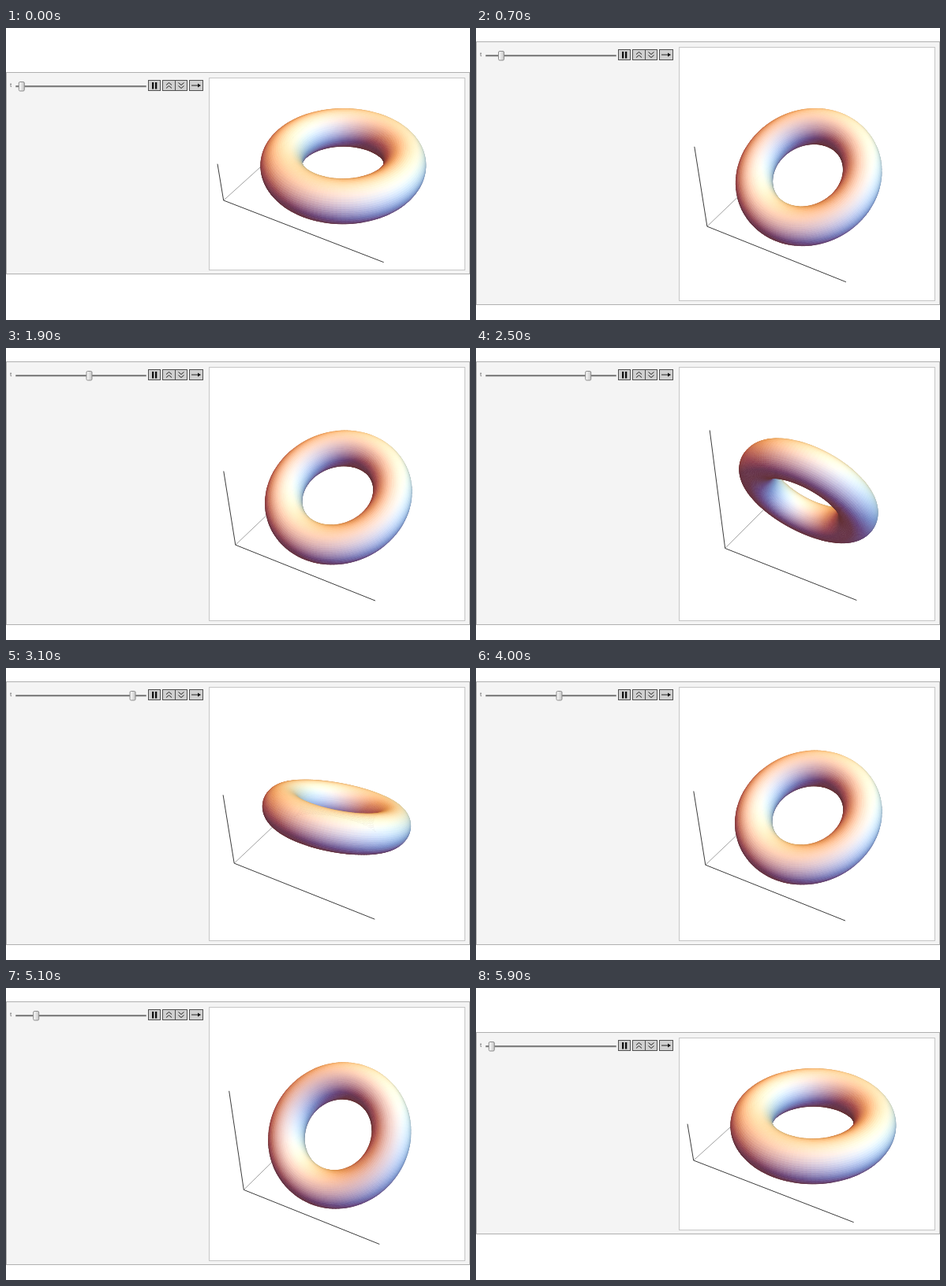
An HTML page with a canvas for the animation above (6 s loop, 588x371 px).

```html
<!DOCTYPE html>
<html lang="en">
<head>
<meta charset="utf-8">
<title>Rotating torus</title>
<style>
html, body { margin: 0; width: 100%; height: 100%; overflow: hidden; background: #fff; }
svg, canvas { position: absolute; left: 0; top: 0; display: block; }
</style>
</head>
<body>
<svg width="588" height="371" viewBox="0 0 588 371">
  <defs>
    <linearGradient id="knob" x1="0" x2="1" y1="0" y2="0">
      <stop offset="0" stop-color="#fff"/>
      <stop offset="1" stop-color="#c4c4c4"/>
    </linearGradient>
  </defs>
  <rect id="panel" x=".5" width="587" fill="#f4f4f4" stroke="#b0b0b0"/>
  <rect id="pane" x="257.5" width="324" fill="#fff" stroke="#c6c6c6"/>
  <g id="controls">
    <text x="5" y="19" font-family="'Liberation Sans', sans-serif" font-size="8" fill="#666">t</text>
    <rect x="12" y="17" width="166" height="2" rx="1" fill="#808080"/>
    <rect x="12" y="19" width="166" height="1" fill="#d8d8d8"/>
    <rect id="thumb" y="12.5" width="7" height="11.500" rx="1.5" fill="url(#knob)" stroke="#8c8c8c"/>
    <g fill="#d0d0d0" stroke="#505050">
      <rect x="180.5" y="10.5" width="15" height="13"/>
      <rect x="198.5" y="10.5" width="16" height="13"/>
      <rect x="214.5" y="10.5" width="15" height="13"/>
      <rect x="232.5" y="10.5" width="17" height="13"/>
    </g>
    <path d="M185 13h2.3v8.500h-2.3zM189 13h2.3v8.500h-2.3zM243 14.5l4 2.5-4 2.5z" fill="#111"/>
    <path d="M235 17h9M203 16.5l3.5-3 3.5 3M203 20.5l3.5-3 3.5 3M218.5 13.5l3.5 3 3.5-3M218.5 17.5l3.5 3 3.5-3" fill="none" stroke="#222"/>
  </g>
  <path id="depthAxis" fill="none" stroke="#777" stroke-width=".7"/>
  <path id="axes" fill="none" stroke="#3c3c3c"/>
</svg>
<canvas id="scene" width="588" height="371"></canvas>
<script>
const $ = id => document.getElementById(id);
const ctx = $("scene").getContext("2d");

const RING = 3, TUBE = 1, DIST = 27.07, PAD = 1.05;
const STEP = 14.66 * Math.PI / 180, FIRST = 0.01;
const NU = 144, NW = 64;

const dot = (a, b) => a[0] * b[0] + a[1] * b[1] + a[2] * b[2];
const unit = a => { const l = Math.hypot(...a); return a.map(v => v / l); };

// Camera basis for the view point (1.3, -2.4, 2)
const TOWARD = unit([1.3, -2.4, 2]);
const RIGHT = unit([2.4, 1.3, 0]);
const UP = [-TOWARD[2] * RIGHT[1], TOWARD[2] * RIGHT[0],
  TOWARD[0] * RIGHT[1] - TOWARD[1] * RIGHT[0]];
const toCamera = p => [dot(p, RIGHT), dot(p, UP), dot(p, TOWARD)];
const project = q => [q[0] / (DIST - q[2]), -q[1] / (DIST - q[2])];

// Directions and colours of the lights, in camera space
const AMBIENT = [0.4, 0.2, 0.2];
const LIGHTS = [
  [[2, 0, 2], [0, 0.18, 0.5]],
  [[2, 2, 3], [0.18, 0.5, 0.18]],
  [[0, 2, 2], [0.5, 0.18, 0]],
  [[0, 0, 2], [0, 0, 0.18]]
].map(([dir, color]) => ({ dir: unit(dir), color }));

function shade(n) {
  const c = AMBIENT.slice();
  for (const l of LIGHTS) {
    const k = Math.max(0, dot(n, l.dir));
    for (let j = 0; j < 3; j++) c[j] += k * l.color[j];
  }
  return "rgb(" + c.map(v => Math.round(255 * Math.min(1, v))) + ")";
}

function boxOf(angle) {
  const s = Math.abs(Math.sin(angle)), c = Math.abs(Math.cos(angle));
  return [RING + TUBE, RING * c + TUBE, RING * s + TUBE].map(v => v * PAD);
}

const corner = (box, sx, sy, sz) =>
  project(toCamera([sx * box[0], sy * box[1], sz * box[2]]));

// Near the quarter turns the view is fitted to the pane width
function layout(angle, box) {
  if (Math.abs(Math.sin(2 * angle)) > 0.16)
    return { scale: 635, cx: 419.5, cy: 185.4, height: 322 };
  const xs = [], ys = [], ends = [-1, 1];
  for (const a of ends) for (const b of ends) for (const c of ends) {
    const [x, y] = corner(box, a, b, c);
    xs.push(x);
    ys.push(y);
  }
  const x0 = Math.min(...xs), x1 = Math.max(...xs);
  const y0 = Math.min(...ys), y1 = Math.max(...ys);
  const scale = 303 / (x1 - x0);
  return {
    scale,
    cx: 419.5 - scale * (x0 + x1) / 2,
    cy: 185.5 - scale * (y0 + y1) / 2,
    height: Math.round(scale * (y1 - y0) + 20)
  };
}

function drawTorus(angle, view) {
  const s = Math.sin(angle), c = Math.cos(angle);
  const turn = (x, y, z) => toCamera([x, y * c - z * s, y * s + z * c]);
  const surface = (i, j) => {
    const u = i * 2 * Math.PI / NU, w = j * 2 * Math.PI / NW;
    const cu = Math.cos(u), su = Math.sin(u), cw = Math.cos(w), sw = Math.sin(w);
    const r = RING + TUBE * cw;
    return { p: turn(r * cu, r * su, TUBE * sw), n: turn(cw * cu, cw * su, sw) };
  };
  const place = (i, j) => {
    const [x, y] = project(surface(i, j).p);
    return [view.cx + view.scale * x, view.cy + view.scale * y];
  };

  const faces = [];
  for (let i = 0; i < NU; i++) for (let j = 0; j < NW; j++) {
    const { p, n } = surface(i + 0.5, j + 0.5);
    if (n[2] * DIST - dot(n, p) > -0.8)
      faces.push({ i, j, n, far: Math.hypot(p[0], p[1], DIST - p[2]) });
  }
  faces.sort((a, b) => b.far - a.far);

  ctx.clearRect(0, 0, 588, 371);
  ctx.lineWidth = 0.6;
  ctx.lineJoin = "round";
  for (const { i, j, n } of faces) {
    ctx.fillStyle = ctx.strokeStyle = shade(n);
    ctx.beginPath();
    ctx.moveTo(...place(i, j));
    ctx.lineTo(...place(i + 1, j));
    ctx.lineTo(...place(i + 1, j + 1));
    ctx.lineTo(...place(i, j + 1));
    ctx.closePath();
    ctx.fill();
    ctx.stroke();
  }
}

function drawAxes(box, view) {
  const at = (...signs) => {
    const [x, y] = corner(box, ...signs);
    return (view.cx + view.scale * x).toFixed(1) + " " + (view.cy + view.scale * y).toFixed(1);
  };
  const origin = at(-1, -1, -1);
  $("axes").setAttribute("d", `M${at(-1, -1, 1)}L${origin}L${at(1, -1, -1)}`);
  $("depthAxis").setAttribute("d", `M${origin}L${at(-1, 1, -1)}`);
}

function drawPanel(height, thumbX) {
  const top = Math.floor(185.7 - height / 2) + 0.5;
  $("pane").setAttribute("y", top);
  $("pane").setAttribute("height", height);
  $("panel").setAttribute("y", top - 7);
  $("panel").setAttribute("height", height + 12);
  $("controls").setAttribute("transform", `translate(0 ${top - 7.5})`);
  $("thumb").setAttribute("x", thumbX - 3.5);
}

let shown = -1;
function render(ms) {
  // 60 ticks there and back, resting at the start
  const tick = Math.floor(ms / 100) % 60;
  const step = Math.max(0, Math.min(tick, 59 - tick) - 5);
  if (step === shown) return;
  shown = step;
  const angle = FIRST + step * STEP;
  const box = boxOf(angle);
  const view = layout(angle, box);
  drawPanel(view.height, 19.8 + 6.12 * step);
  drawAxes(box, view);
  drawTorus(angle, view);
}

const start = performance.now();
function loop() {
  render(performance.now() - start);
  requestAnimationFrame(loop);
}
loop();
</script>
</body>
</html>
```
